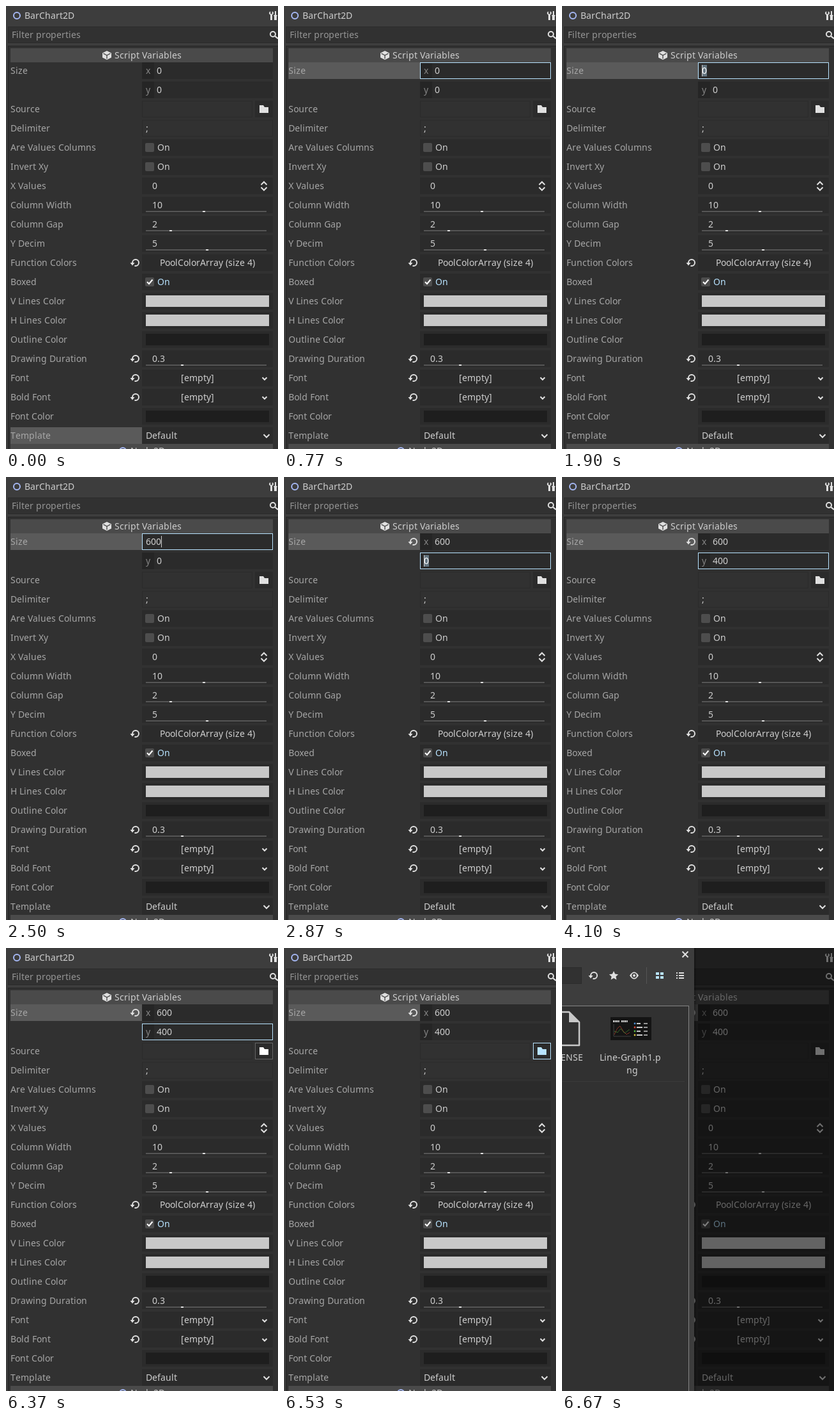
Animation of 426x692 px, one loop 8 s. Source, as an HTML page with a canvas:

```html
<!DOCTYPE html>
<html lang="en">
<head>
<meta charset="utf-8">
<title>Inspector</title>
<style>
html, body { margin: 0; width: 100%; height: 100%; overflow: hidden; background: #3d3d3d; }
canvas { display: block; }
</style>
</head>
<body>
<canvas id="stage" width="426" height="692"></canvas>
<script>
const ctx = document.getElementById('stage').getContext('2d');
const LOOP = 8000;
const BASE = '#3d3d3d', PANEL = '#313131', FIELD = '#2b2b2b', DEEP = '#252525';
const TEXT = '#cecece', LABEL = '#a6a6a6', FAINT = '#858585', ICON = '#e0e0e0';
const ACCENT = '#b8e3ff', NODE = '#a5b7f3';
const LEFT = 213, RIGHT = 418, ROW_H = 26;
const rowTop = i => 88 + 30 * i;

function box(x, y, w, h, color) {
  ctx.fillStyle = color;
  ctx.fillRect(x, y, w, h);
}

function frame(x, y, w, h, color) {
  ctx.strokeStyle = color;
  ctx.lineWidth = 1;
  ctx.strokeRect(x + 0.5, y + 0.5, w - 1, h - 1);
}

// Glyph advances snap to whole pixels, as in the editor's own text.
const advances = {};
function advance(ch) {
  return advances[ch] ??= Math.round(ctx.measureText(ch).width);
}

function text(str, x, base, color = TEXT) {
  ctx.fillStyle = color;
  for (const ch of str) {
    ctx.fillText(ch, x, base);
    x += advance(ch);
  }
}

function textWidth(str) {
  return [...str].reduce((sum, ch) => sum + advance(ch), 0);
}

function centered(str, cx, base, color) {
  text(str, Math.round(cx - textWidth(str) / 2 - 0.01), base, color);
}

function poly(points, color, width, close) {
  ctx.beginPath();
  points.forEach(([x, y], i) => i ? ctx.lineTo(x, y) : ctx.moveTo(x, y));
  if (close) ctx.closePath();
  if (width) {
    ctx.strokeStyle = color;
    ctx.lineWidth = width;
    ctx.stroke();
  } else {
    ctx.fillStyle = color;
    ctx.fill();
  }
}

function ring(x, y, r, color, width, from = 0, to = Math.PI * 2) {
  ctx.beginPath();
  ctx.arc(x, y, r, from, to);
  ctx.strokeStyle = color;
  ctx.lineWidth = width;
  ctx.stroke();
}

function disc(x, y, r, color) {
  ctx.beginPath();
  ctx.arc(x, y, r, 0, Math.PI * 2);
  ctx.fillStyle = color;
  ctx.fill();
}

function revertIcon(x, y) {
  ring(x + 1, y, 5, ICON, 2, Math.PI, Math.PI * 2.6);
  poly([[x - 7.5, y], [x - 0.5, y], [x - 4, y + 4.5]], ICON);
}

function chevron(x, y, r, up) {
  const d = up ? -r / 2 : r / 2;
  poly([[x - r, y - d], [x, y + d], [x + r, y - d]], ICON, 2);
}

function cubeIcon(x, y) {
  poly([[x, y - 7], [x + 7, y - 3.5], [x + 7, y + 3.5], [x, y + 7],
    [x - 7, y + 3.5], [x - 7, y - 3.5]], ICON, 0, true);
  poly([[x - 5.5, y - 2.8], [x, y], [x + 5.5, y - 2.8]], '#4a4a4a', 1.4);
  poly([[x, y], [x, y + 5.5]], '#4a4a4a', 1.4);
}

function folderIcon(x, y, color) {
  poly([[x, y], [x + 6, y], [x + 8, y + 3], [x + 14, y + 3],
    [x + 14, y + 12], [x, y + 12]], color, 0, true);
}

function toolsIcon(x, y) {
  box(x, y - 1, 3, 8, ICON);
  ring(x + 1.5, y - 4, 2.4, ICON, 1.8, -0.9, Math.PI + 0.9);
  box(x + 7, y - 7, 2, 6, ICON);
  box(x + 5.5, y - 1, 5, 2, ICON);
  box(x + 6, y + 1, 4, 6, ICON);
}

function searchIcon(x, y) {
  ring(x, y, 4, ICON, 2);
  poly([[x + 3, y + 3], [x + 8, y + 7]], ICON, 2.2);
}

function category(name, y, drawIcon) {
  box(7, y, 411, 22, '#4a4a4a');
  const left = Math.floor(212.5 - (textWidth(name) + 20) / 2);
  drawIcon(left + 8, y + 11);
  text(name, left + 20, y + 16);
}

function label(i, name, selected, changed) {
  const y = rowTop(i);
  if (selected) box(7, y, 206, ROW_H, '#5a5a5a');
  text(name, 7, y + 18, LABEL);
  if (changed) revertIcon(202, y + 13);
}

function field(i) {
  box(LEFT, rowTop(i), RIGHT - LEFT, ROW_H, FIELD);
  return rowTop(i);
}

function lineEdit(x, y, w) {
  box(x, y, w, ROW_H, PANEL);
  frame(x, y, w, ROW_H, FIELD);
}

function vectorField(i, axis, value, focused) {
  const y = field(i);
  box(LEFT, y, 19, ROW_H, DEEP);
  text(axis, 219, y + 18, FAINT);
  text(value, 236, y + 18);
  if (focused) frame(LEFT, y, RIGHT - LEFT, ROW_H, ACCENT);
}

function editField(i, value, selected, caret) {
  const y = field(i);
  frame(LEFT, y, RIGHT - LEFT, ROW_H, ACCENT);
  const w = textWidth(value);
  if (selected) box(219, y + 4, w, 18, 'rgba(184,227,255,0.4)');
  text(value, 219, y + 18, selected ? '#fff' : TEXT);
  if (caret) box(selected ? 219 : 219 + w, y + 4, 1, 18, TEXT);
}

function checkField(i, on) {
  const y = field(i);
  ctx.fillStyle = '#4d4d4d';
  ctx.beginPath();
  ctx.roundRect(218, y + 6, 14, 14, 2);
  ctx.fill();
  if (on) poly([[221, y + 13], [224, y + 16], [229.5, y + 9.5]], '#fff', 2);
  text('On', 237, y + 18, on ? ACCENT : TEXT);
}

function sliderField(i, value, knob) {
  const y = field(i);
  text(value, 229, y + 18);
  box(219, y + 32 - 10, 189, 2, '#555');
  box(knob - 2, y + 22, 4, 2, ICON);
}

function colorField(i, color) {
  box(219, field(i) + 4, 193, 18, color);
}

function emptyField(i) {
  const y = field(i);
  centered('[empty]', 300, y + 18);
  chevron(405, y + 14, 3.5);
}

// Text typed so far in the edit box, given the key times.
function typed(t, word, times) {
  return word.slice(0, times.filter(k => t >= k).length);
}

function sizeRows(t) {
  label(0, 'Size', t >= 770, t >= 2870);
  if (t >= 870 && t < 2870) {
    const word = typed(t, '600', [2030, 2300, 2500]);
    editField(0, word || '0', !word, t < 1370 || t >= 1900);
  } else {
    vectorField(0, 'x', t < 870 ? '0' : '600', t >= 770 && t < 870);
  }
  if (t >= 2870 && t < 4100) {
    const word = typed(t, '400', [3670, 3770, 3930]);
    editField(1, word || '0', !word, t < 3330 || t >= 3670);
  } else {
    vectorField(1, 'y', t < 2870 ? '0' : '400', t >= 4100 && t < 6530);
  }
}

function sourceRow(t) {
  label(2, 'Source');
  const y = rowTop(2);
  const hover = t >= 6370 && t < 6670, pressed = t >= 6530 && t < 6670;
  lineEdit(LEFT, y, 173);
  box(390, y, 28, ROW_H, FIELD);
  if (hover) frame(390, y, 28, ROW_H, pressed ? ACCENT : '#646464');
  folderIcon(397, y + 7, pressed ? ACCENT : hover ? '#fff' : ICON);
}

function inspector(t) {
  box(0, 0, 426, 692, BASE);
  ring(17, 15, 5, NODE, 2);
  text('BarChart2D', 29, 20);
  toolsIcon(414, 15);
  lineEdit(3, 32, 430);
  text('Filter properties', 9, 50, '#959595');
  searchIcon(418, 44);

  box(3, 62, 423, 630, PANEL);
  box(3, 62, 423, 1, DEEP);
  box(3, 62, 1, 630, DEEP);
  category('Script Variables', 66, cubeIcon);

  sizeRows(t);
  sourceRow(t);
  label(3, 'Delimiter');
  lineEdit(LEFT, rowTop(3), 205);
  text(';', 219, rowTop(3) + 18);
  label(4, 'Are Values Columns');
  checkField(4, false);
  label(5, 'Invert Xy');
  checkField(5, false);
  label(6, 'X Values');
  text('0', 229, field(6) + 18);
  chevron(404, 277, 4.5, true);
  chevron(404, 285.5, 4.5);
  label(7, 'Column Width');
  sliderField(7, '10', 310);
  label(8, 'Column Gap');
  sliderField(8, '2', 258);
  label(9, 'Y Decim');
  sliderField(9, '5', 315);
  label(10, 'Function Colors', false, true);
  centered('PoolColorArray (size 4)', 315.5, field(10) + 18);
  label(11, 'Boxed');
  checkField(11, true);
  label(12, 'V Lines Color');
  colorField(12, '#c8c8c8');
  label(13, 'H Lines Color');
  colorField(13, '#c8c8c8');
  label(14, 'Outline Color');
  colorField(14, '#1e1e1e');
  label(15, 'Drawing Duration', false, true);
  sliderField(15, '0.3', 276);
  label(16, 'Font', false, true);
  emptyField(16);
  label(17, 'Bold Font', false, true);
  emptyField(17);
  label(18, 'Font Color');
  colorField(18, '#1e1e1e');
  label(19, 'Template', t < 770);
  text('Default', 219, field(19) + 18);
  chevron(408, 671.5, 4.5);
  category('Node2D', 684, (x, y) => ring(x, y, 5, NODE, 2));
}

function starIcon(x, y) {
  const points = Array.from({ length: 10 }, (_, i) => {
    const a = i * Math.PI / 5 - Math.PI / 2, r = i % 2 ? 3.6 : 7.5;
    return [x + r * Math.cos(a), y + 0.5 + r * Math.sin(a)];
  });
  poly(points, ICON, 0, true);
}

function eyeIcon(x, y) {
  ctx.beginPath();
  ctx.moveTo(x - 7, y);
  ctx.quadraticCurveTo(x, y - 11, x + 7, y);
  ctx.quadraticCurveTo(x, y + 11, x - 7, y);
  ctx.fillStyle = ICON;
  ctx.fill();
  disc(x, y, 3.8, BASE);
  disc(x, y, 2, ICON);
}

function thumbnail(x, y) {
  box(x, y, 64, 36, '#141414');
  for (let i = 0; i < 9; i++) if (i !== 4) box(x + 4 + i * 2.6, y + 5, 1.8, 3, '#ddd');
  poly([[x + 5, y + 11], [x + 5, y + 30], [x + 32, y + 30]], '#555', 0.7);
  ctx.setLineDash([1.5, 1]);
  poly([[x + 6, y + 27], [x + 11, y + 17], [x + 15, y + 14], [x + 20, y + 22],
    [x + 25, y + 27], [x + 30, y + 24]], '#c8452f', 1);
  poly([[x + 6, y + 22], [x + 11, y + 24], [x + 16, y + 18], [x + 22, y + 25],
    [x + 30, y + 19]], '#4f9a3c', 1);
  ctx.setLineDash([]);
  ['#4a8fd8', '#d8483a', '#58b84a', '#d8c43c'].forEach((color, i) => {
    const ly = y + 10 + i * 6;
    disc(x + 38, ly, 1.4, color);
    box(x + 41, ly - 1, 6 + i % 2 * 3, 2, '#ccc');
    box(x + 52, ly - 1, 6, 2, '#999');
  });
}

function fileDialog() {
  const shade = ctx.createLinearGradient(207, 0, 211, 0);
  shade.addColorStop(0, 'rgba(0,0,0,0.3)');
  shade.addColorStop(1, 'rgba(0,0,0,0)');
  box(207, 0, 4, 692, shade);
  box(0, 0, 207, 692, BASE);
  poly([[188.5, 5.5], [197.5, 14.5]], ICON, 2);
  poly([[197.5, 5.5], [188.5, 14.5]], ICON, 2);

  lineEdit(-10, 30, 41);
  revertIcon(49, 43);
  starIcon(81, 43);
  eyeIcon(113, 43);
  box(132, 30, 1, 26, '#555');
  for (const dx of [-6, 1]) for (const dy of [-5, 1]) box(153 + dx, 43 + dy, 5, 4, ACCENT);
  for (const dy of [-5, -1, 3]) {
    box(179, 43 + dy, 2, 2, ICON);
    box(183, 43 + dy, 8, 2, ICON);
  }

  box(0, 90, 199, 602, PANEL);
  box(0, 90, 199, 1, '#858585');
  box(198, 90, 1, 602, '#858585');
  ctx.lineJoin = 'round';
  poly([[-18, 100], [11, 100], [27, 116], [27, 152], [-18, 152]], '#c8c8c8', 2.5, true);
  poly([[11, 100], [27, 116], [11, 116]], '#c8c8c8');
  ctx.lineJoin = 'miter';
  centered('LICENSE', 5, 176);
  thumbnail(76, 108);
  centered('Line-Graph1.p', 107, 176);
  centered('ng', 110.5, 196);
  box(0, 208, 192, 1, '#3b3b3b');
}

function draw(t) {
  ctx.font = '14px "Noto Sans", "Open Sans", sans-serif';
  ctx.textBaseline = 'alphabetic';
  inspector(t);
  if (t >= 6670) {
    box(0, 0, 426, 692, 'rgba(0,0,0,0.5)');
    fileDialog();
  }
}

const start = performance.now();
function tick() {
  draw((performance.now() - start) % LOOP);
  requestAnimationFrame(tick);
}
tick();
</script>
</body>
</html>
```
